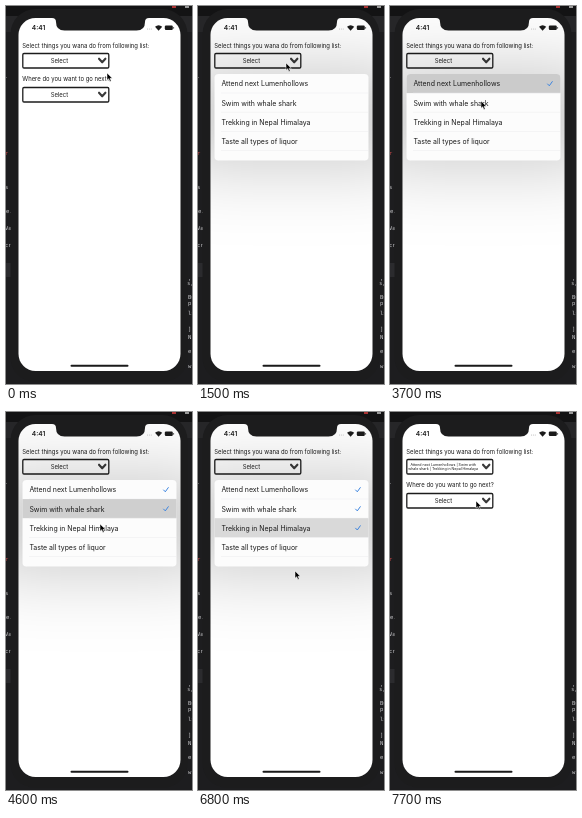
An HTML page for the animation above (8000 ms loop, 186 px wide and 378 px high).

```html
<!DOCTYPE html>
<html lang="en">
<head>
<meta charset="utf-8">
<title>Multi-select dropdown</title>
<style>
html, body { margin: 0; height: 100%; overflow: hidden; background: #18181a; }
svg { display: block; width: 100vw; height: 100vh; font: 5.95px Inter, Roboto, sans-serif; fill: #1a1a1a; }
.mid { text-anchor: middle; }
.row { font-size: 6.95px; }
.code { font: 5.5px "DejaVu Sans Mono", monospace; }
.line { fill: none; stroke-linecap: round; stroke-linejoin: round; }
</style>
</head>
<body>
<svg viewBox="0 0 186 378" preserveAspectRatio="none">
  <defs>
    <clipPath id="screen"><rect x="12.5" y="12" width="162" height="353" rx="17"/></clipPath>
    <clipPath id="panelClip"><rect x="16.5" y="68" width="154" height="86.5" rx="4"/></clipPath>
    <filter id="blur" filterUnits="userSpaceOnUse" x="-180" y="-100" width="550" height="420" color-interpolation-filters="sRGB">
      <feGaussianBlur stdDeviation="40"/>
    </filter>
    <g id="field">
      <rect x="16.8" y="47.5" width="86" height="14.5" rx="1.2" fill="none" stroke="#1c1c1c" stroke-width="1.3"/>
      <path class="line" d="M93 52.7l3.2 3.6 3.2-3.6" stroke="#3a3a3a" stroke-width="2.1"/>
    </g>
  </defs>

  <rect width="186" height="378" fill="#1d1d1f"/>
  <rect width="186" height="10" fill="#131314"/>
  <rect y="10" width="186" height="16" fill="#262628"/>
  <rect y="257" width="8" height="14" fill="#2b2b2e"/>
  <rect x="166" width="4" height="2" fill="#a33"/>
  <rect x="179" width="4" height="2" fill="#999"/>
  <g id="scraps" class="code"></g>

  <rect x="4.5" y="3" width="177" height="373" rx="25" fill="#1c1c1d"/>
  <g clip-path="url(#screen)">
    <rect x="12" y="12" width="163" height="354" fill="#fff"/>
    <text x="16.3" y="41.5">Select things you wana do from following list:</text>
    <use href="#field"/>
    <text id="empty" class="mid" x="53.4" y="57">Select</text>
    <g id="chosen" class="mid" font-size="3.6">
      <text x="53.2" y="53.6">Attend next Lumenhollows | Swim with</text>
      <text x="53.2" y="58.4">whale shark | Trekking in Nepal Himalaya</text>
    </g>
    <g id="second">
      <text x="16.3" y="75.4">Where do you want to go next?</text>
      <use href="#field" y="34"/>
      <text class="mid" x="53.4" y="91">Select</text>
    </g>
    <g id="panel">
      <rect x="-30" y="68" width="247" height="86.5" filter="url(#blur)" fill="#000" fill-opacity=".24"/>
      <g id="rows" clip-path="url(#panelClip)">
        <rect x="16" y="68" width="156" height="87" fill="#fcfcfc"/>
      </g>
    </g>
    <text x="25.8" y="24.4" font-size="6.6" font-weight="600">4:41</text>
    <g fill="#bbb">
      <circle cx="141.5" cy="23" r=".6"/><circle cx="143.4" cy="23" r=".6"/><circle cx="145.3" cy="23" r=".6"/>
    </g>
    <path d="M149 20.7q3.6-3 7.2 0l-3.6 4z"/>
    <rect x="158.8" y="19.6" width="8" height="4.4" rx="1.2"/>
    <rect x="167.3" y="20.9" width=".8" height="1.8" rx=".4"/>
    <rect x="64.5" y="358.8" width="58" height="2" rx="1"/>
  </g>
  <path d="M46 11V12q4 0 4 4 0 8.5 8.5 8.5h72q8.5 0 8.5-8.5 0-4 4-4V11z" fill="#1c1c1d"/>
  <path id="cursor" d="M0 0V7.2L1.7 5.7 2.9 8.5 4.2 7.9 3 5.3H5.3z" fill="#000" stroke="#fff" stroke-width=".5"/>
</svg>
<script>
const LOOP = 8000;
const $ = id => document.getElementById(id);

function add(parent, tag, attrs, text = "") {
  const el = document.createElementNS("http://www.w3.org/2000/svg", tag);
  for (const k in attrs) el.setAttribute(k, attrs[k]);
  el.textContent = text;
  return parent.appendChild(el);
}

// Editor text peeking out beside the phone: [x, baseline, text]
const scraps = [
  [-2, 72, "i"], [-1, 149, "r"], [-1, 183, "s"], [0, 207, "e."], [-1, 224, "Va"], [-1, 241, "cr"],
  [182, 274, ","], [181, 279, "s,"], [182, 293, "Bu"], [182, 299, "p"], [182, 309, "ls"],
  [182, 325, "]"], [182, 333, "N"], [182, 347, "e"], [182, 362, "w"]
];
for (const [x, y, s] of scraps) add($("scraps"), "text", { x, y, fill: s === "r" ? "#b44" : "#c9c9cc" }, s);

const items = [
  { label: "Attend next Lumenhollows", press: 2700, check: 2800, until: 3900, tint: "#cbcbcb" },
  { label: "Swim with whale shark", press: 3900, check: 4000, until: 5800, tint: "#cfcfcf" },
  { label: "Trekking in Nepal Himalaya", press: 5800, check: 5800, until: LOOP, tint: "#d9d9d9" },
  { label: "Taste all types of liquor", press: LOOP, check: LOOP, until: LOOP, tint: "#d9d9d9" }
];
items.forEach((item, i) => {
  const y = 68 + 19.1 * i, rows = $("rows");
  item.back = add(rows, "rect", { x: 16, y, width: 156, height: 19.1, fill: item.tint });
  add(rows, "rect", { x: 23, y: y + 18.8, width: 148, height: .4, fill: "#e6e6e8" });
  add(rows, "text", { x: 23.4, y: y + 12.4, class: "row" }, item.label);
  item.tick = add(rows, "path", {
    d: `M157.6 ${y + 10}l1.7 1.8 3-4.2`, class: "line", stroke: "#3d85e0", "stroke-width": 1
  });
});

// Cursor tip: [time, x, y]
const path = [
  [0, 101, 67], [100, 100, 66], [900, 88.5, 57.5], [1000, 88, 57], [2000, 88, 57], [2300, 90, 74],
  [2700, 90, 74], [3200, 89, 87], [3500, 89, 87], [3700, 91, 95], [3900, 91, 95],
  [4600, 94, 112], [4900, 94, 112], [5200, 93, 122], [5500, 92, 117], [5900, 92, 117],
  [6200, 97, 159], [6800, 97, 159], [7600, 87, 90], [7700, 86, 89], [LOOP, 86, 89]
];

function tip(t) {
  const i = path.findIndex(p => p[0] > t);
  const a = path[i - 1], b = path[i];
  const k = (t - a[0]) / (b[0] - a[0]), e = k * k * (3 - 2 * k);
  return [a[1] + (b[1] - a[1]) * e, a[2] + (b[2] - a[2]) * e];
}

function panelOpacity(t) {
  if (t < 1300) return 0;
  if (t < 1500) return .6;
  return Math.max(0, Math.min(1, (7100 - t) / 250));
}

const show = (el, on) => el.setAttribute("visibility", on ? "visible" : "hidden");

function draw(t) {
  const open = panelOpacity(t);
  $("panel").setAttribute("opacity", open);
  $("second").setAttribute("opacity", 1 - open);
  for (const item of items) {
    show(item.back, t >= item.press && t < item.until);
    show(item.tick, t >= item.check);
  }
  show($("empty"), t < 6900);
  show($("chosen"), t >= 6900);
  $("cursor").setAttribute("transform", `translate(${tip(t)})`);
}

const start = performance.now();
function frame() {
  draw((performance.now() - start) % LOOP);
  requestAnimationFrame(frame);
}
frame();
</script>
</body>
</html>
```
